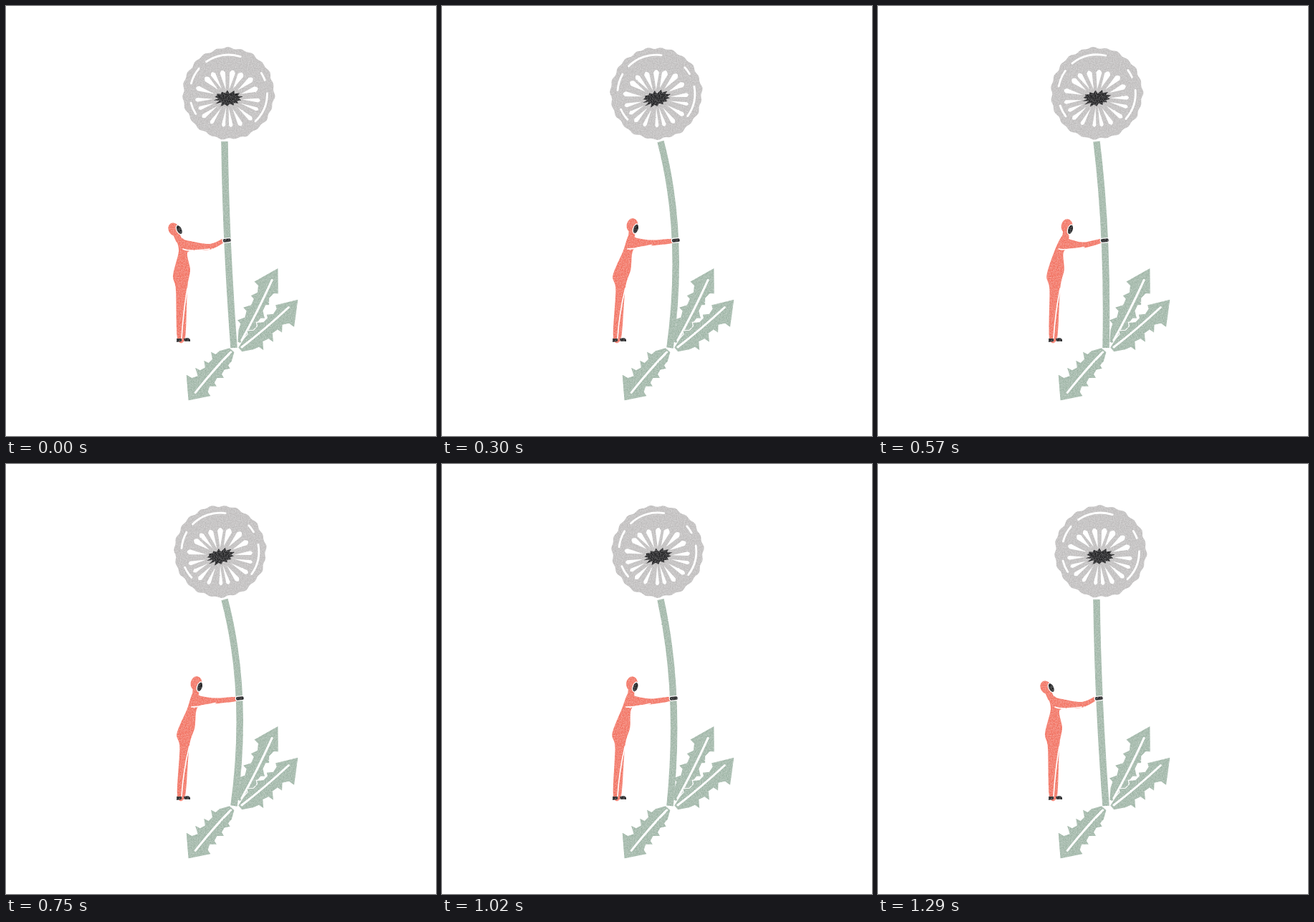
These frames come from a looping animation (600x600 px, 2.32 s). An HTML page:

```html
<!DOCTYPE html>
<html lang="en">
<head>
<meta charset="utf-8">
<title>Dandelion</title>
<style>
html, body { margin: 0; width: 100%; height: 100%; overflow: hidden; background: #fff; }
svg { display: block; width: 100vw; height: 100vh; }
.green { fill: #97af9f; }
.grey { fill: #bab8b8; }
.red { fill: #f16755; }
.ink { fill: #0a0a0c; }
.white { fill: #fff; }
.edge { stroke: #fff; stroke-width: 1.2; }
.line { fill: none; stroke: #fff; stroke-linecap: round; stroke-linejoin: round; }
#stem { fill: none; stroke: #97af9f; stroke-width: 9.5; }
#neck { fill: none; stroke: #f16755; stroke-width: 9; stroke-linecap: round; }
</style>
</head>
<body>
<svg viewBox="0 0 600 600">
  <filter id="print" filterUnits="userSpaceOnUse" x="0" y="0" width="600" height="600" color-interpolation-filters="sRGB">
    <feTurbulence type="fractalNoise" baseFrequency=".6" numOctaves="2" seed="4" result="noise"/>
    <feDisplacementMap in="SourceGraphic" in2="noise" scale="1.5" xChannelSelector="R" yChannelSelector="G" result="rough"/>
    <feColorMatrix in="noise" values="0 0 0 0 1  0 0 0 0 1  0 0 0 0 1  0 0 0 .6 -.1"/>
    <feComposite in2="rough" operator="atop"/>
  </filter>
  <g filter="url(#print)">
    <g id="leaves"></g>
    <path id="stem"/>
    <g id="flower"></g>
    <path id="body" class="red"/>
    <path id="neck"/>
    <path id="folds" class="line" stroke-width="1.6"/>
    <g id="head">
      <ellipse class="red" rx="8" ry="10"/>
      <ellipse class="ink edge" cx="5.5" cy="4" rx="3.8" ry="7" transform="rotate(10 5.5 4)"/>
    </g>
    <rect id="hand" class="ink edge" x="-6" y="-3" width="12" height="6" rx="2.5"/>
    <path class="ink" d="M238 464H245V468L238 469ZM248 464L254 463 257 465V468H249Z"/>
  </g>
</svg>
<script>
const LOOP = 2320, STEP = 30;
const $ = id => document.getElementById(id);
const set = (id, name, value) => $(id).setAttribute(name, value);
const shape = (cls, d, more = '') => `<path class="${cls}" d="${d}" ${more}/>`;

let seed = 7;
function rand(lo, hi) {
  seed = seed * 16807 % 2147483647;
  return lo + (hi - lo) * seed / 2147483647;
}

// Closed ring around (cx, cy); radius(a) gives [rx, ry]
function ring(cx, cy, n, radius) {
  const pts = [];
  for (let i = 0; i < n; i++) {
    const a = i * 2 * Math.PI / n, [rx, ry] = radius(a, i);
    pts.push([cx + rx * Math.cos(a), cy + ry * Math.sin(a)]);
  }
  return 'M' + pts.join('L') + 'Z';
}

// Toothed leaf; right and left are the tooth lengths on either side
function leaf([bx, by], [tx, ty], right, left) {
  const dx = tx - bx, dy = ty - by, len = Math.hypot(dx, dy);
  const at = (s, w) => [bx + s * dx - w * dy / len, by + s * dy + w * dx / len];
  const side = w => {
    const pts = [];
    for (let s = .73; s > .2; s -= .16) {
      const reach = w * (s > .7 ? 1 : rand(.75, .95));
      pts.push(at(s, reach), at(s - .02, reach * .65), at(s - .09, w * .5));
    }
    return [...pts, at(.03, w * .2)];
  };
  const outline = [at(1, 0), ...side(right), ...side(left).reverse()];
  return shape('green edge', 'M' + outline.join('L') + 'Z') +
    shape('line', `M${at(.84, 0)}Q${at(.4, 2)} ${at(.07, 0)}`, 'stroke-width="3"');
}

function flower() {
  let art = shape('grey', ring(310.5, 122, 120, a => {
    const r = 63.6 + Math.sin(a * 23) + .6 * Math.sin(a * 11 + 1);
    return [r, r];
  }));
  for (let a = 0; a < 360; a += 20) {
    const c = Math.abs(Math.cos(a * Math.PI / 180));
    const r = 11 + 9 * c, end = rand(38, 42) + 5 * c, w = rand(2.4, 3.4) + (a > 180 ? 1 : 0);
    art += shape('white', `M${r} 0L${end - w} ${-w}Q${end + w} 0 ${end - w} ${w}Z`,
      `transform="translate(309 129) rotate(${a + rand(-4, 4)})"`);
  }
  const glint = (from, to) => {
    const p = deg => [310.5 + 54 * Math.cos(deg * Math.PI / 180), 122 + 54 * Math.sin(deg * Math.PI / 180)];
    return shape('line', `M${p(from)}A54 54 0 0 1 ${p(to)}`, 'stroke-width="2.8"');
  };
  art += glint(-125, -72) + glint(0, 46) + glint(-165, -140) + glint(148, 166) + glint(-32, -20);
  return art + shape('ink', ring(309, 129, 28, (a, i) => {
    const k = i % 2 ? rand(1, 1.25) : rand(.65, .9);
    return [18 * k, 10 * k];
  }));
}

// Hand offset keys: two equal sways, a quicker third, then rest
const sway = [[0, 0]];
for (const t of [0, 450]) sway.push([t + 120, 8], [t + 300, 18], [t + 330, 18], [t + 435, -18]);
sway.push([1020, 15], [1050, 18], [1170, -18], [1290, 0], [LOOP, 0]);

// Zero at turning points, otherwise the slope through the neighbours
function slope(i) {
  const [p, k, n] = [sway[i - 1], sway[i], sway[i + 1]];
  return p && n && (n[1] - k[1]) * (k[1] - p[1]) > 0 ? (n[1] - p[1]) / (n[0] - p[0]) : 0;
}

function offsetAt(t) {
  const i = sway.findIndex(k => k[0] > t) - 1;
  const [t0, u0] = sway[i], [t1, u1] = sway[i + 1], d = t1 - t0, k = (t - t0) / d;
  return u0 + (u1 - u0) * k * k * (3 - 2 * k) +
    d * k * (1 - k) * (slope(i) * (1 - k) - slope(i + 1) * k);
}

function smooth(pts) {
  const n = pts.length, at = i => pts[(i + n) % n];
  const handle = (p, a, b, s) => p.map((v, j) => (v + s * (b[j] - a[j]) / 7).toFixed(2));
  return 'M' + pts[0] + pts.map((p, i) => {
    const q = at(i + 1);
    return `C${handle(p, at(i - 1), q, 1)} ${handle(q, p, at(i + 2), -1)} ${q}`;
  }).join('') + 'Z';
}

function draw(t) {
  const u = offsetAt(t);
  const nod = Math.max(0, Math.min(1, u / 8)); // head comes forward early in the push
  const head = [235 + 27 * nod + .2 * u, 312 - 4 * nod - .1 * u];
  const nape = [237 + 18 * nod + .3 * u, 322 - 2 * nod];
  const back = [241 + .65 * u, 342];
  const hip = [233 + .3 * u, 376];
  const crotch = [253 + .15 * u, 394];
  const belly = [257 + .35 * u, 368];
  const armpit = [254 + .75 * u, 343 - .2 * u];
  const elbow = [284 + .45 * u, 336 - .3 * u];
  const shoulder = [252 + 13 * nod + .3 * u, 327 - .2 * u];
  const wrist = 302.5 + u;

  set('stem', 'd', `M305 189Q${306.5 + 1.83 * u} 320 318 477`);
  set('flower', 'transform', `rotate(${-.57 * u} 305 187)`);
  set('body', 'd', smooth([
    nape, back, hip, [hip[0] + 4, 396], [239, 463], [250, 463], crotch, belly, armpit,
    [elbow[0], elbow[1] + 4], [wrist, 331], [wrist, 325], [elbow[0], elbow[1] - 4],
    shoulder, [nape[0] + 9, nape[1] + 2]
  ]));
  set('neck', 'd', `M${head}L${nape[0] + 4} ${nape[1] + 4}`);
  set('folds', 'd', `M${crotch}Q247 430 245 464M${back[0] + 6} ${back[1] - 3}Q${armpit[0]} ${armpit[1]} ${elbow[0]} ${elbow[1] + 3}`);
  set('head', 'transform', `translate(${head}) rotate(${-35 + 43 * nod})`);
  set('hand', 'transform', `translate(${308.3 + u} 327) rotate(-5)`);
}

$('leaves').innerHTML =
  leaf([325, 474], [380, 365], 17, -22) +
  leaf([323, 481], [408, 409], 27, -15) +
  leaf([318, 478], [254, 551], 27, -20);
$('flower').innerHTML = flower();

const start = performance.now();
function tick() {
  const t = (performance.now() - start) % LOOP;
  draw(Math.floor(t / STEP) * STEP);
  requestAnimationFrame(tick);
}
tick();
</script>
</body>
</html>
```
